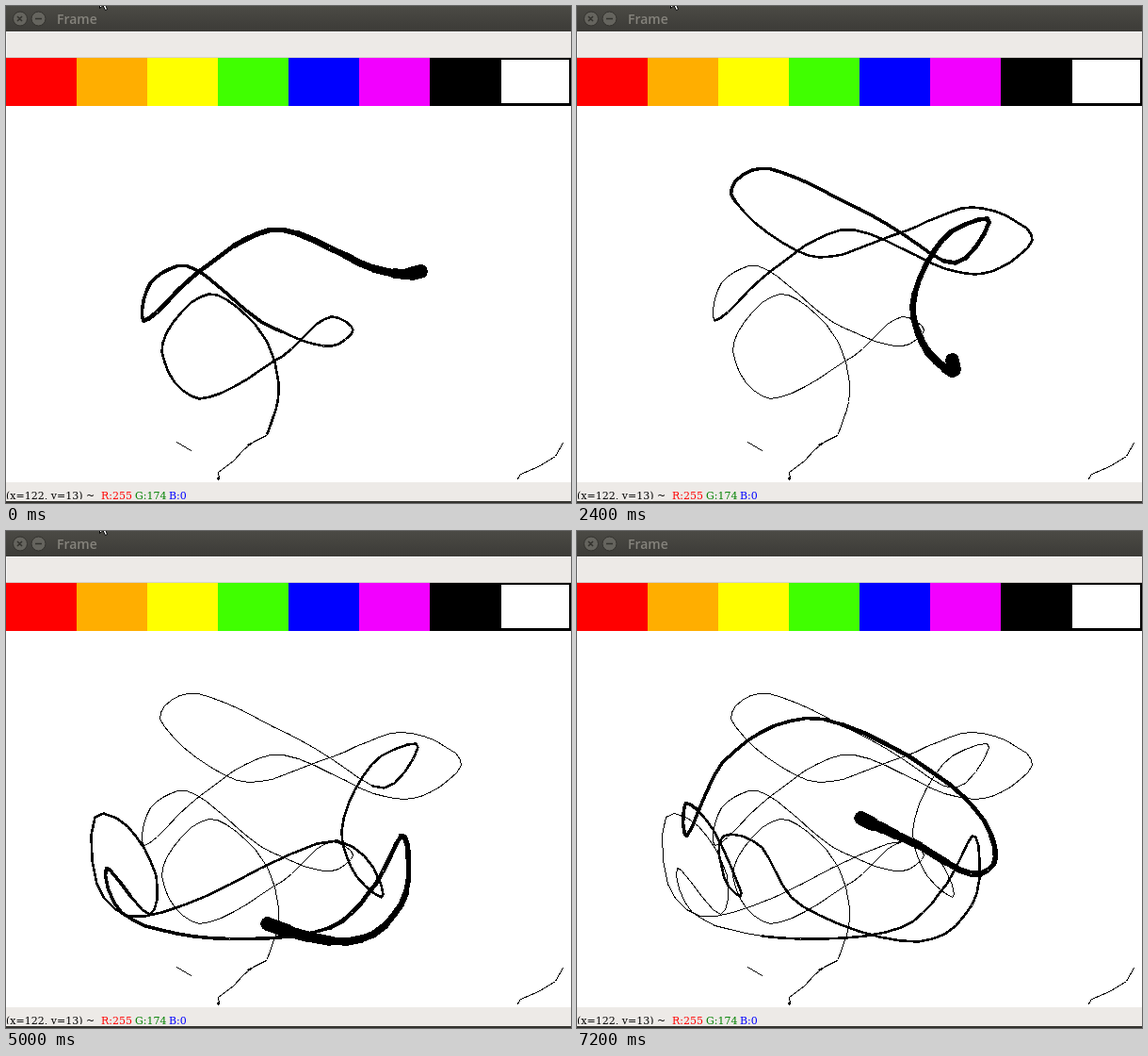
An HTML page that plays this animation: 600 px wide and 527 px high, repeating every 7.3 s.

```html
<!DOCTYPE html>
<html lang="en">
<head>
<meta charset="utf-8">
<title>Frame</title>
<style>
  html, body { margin: 0; width: 100%; height: 100%; overflow: hidden; background: #fff; }
  svg { display: block; width: 600px; height: 527px; }
  .title { font: 600 14px "Open Sans", sans-serif; fill: #85837c; }
  .status { font: 11px "DejaVu Serif", serif; }
  .ink { fill: none; stroke: #000; stroke-linecap: round; stroke-linejoin: round; shape-rendering: crispEdges; }
</style>
</head>
<body>
<svg viewBox="0 0 600 527">
  <defs>
    <linearGradient id="bar" x2="0" y2="1">
      <stop stop-color="#4b4a45"/>
      <stop offset="1" stop-color="#3c3b37"/>
    </linearGradient>
  </defs>
  <rect width="600" height="27" fill="url(#bar)"/>
  <g fill="#65645e" stroke="#33322e">
    <circle cx="15" cy="13.5" r="7.5"/>
    <circle cx="34.5" cy="13.5" r="7.5"/>
    <path d="M12 11l5 5m0-5l-5 5M31 13.5h7" stroke-width="1.6"/>
  </g>
  <text class="title" x="54" y="19">Frame</text>

  <rect y="27" width="600" height="28" fill="#edeae7"/>
  <path d="M0 27.5H600M.5 27V54" stroke="#f9f8f7"/>
  <path d="M0 54.5H600" stroke="#d8d4d0"/>

  <g id="palette" shape-rendering="crispEdges"></g>

  <g class="ink" transform="translate(.5 .5)">
    <path d="M181 462l15 9M543 501l3-5 19-8 18-11 8-14M226 501l-1-7 16-12 11-12 10-8 14-7"/>
    <path d="M257 465l2-1M225 500v1" stroke-width="2.5"/>
    <g id="trail"></g>
  </g>

  <rect y="505" width="600" height="20" fill="#edeae7"/>
  <text class="status" y="523"><tspan x="0">(x=122, y=13) ~</tspan><tspan x="101" fill="#f00">R:255</tspan><tspan x="137" fill="#008000">G:174</tspan><tspan x="173" fill="#00f">B:0</tspan></text>
  <rect y="523" width="600" height="2" fill="#edeae7"/>
  <rect y="525" width="600" height="2" fill="#33322e"/>

  <path id="cursor" d="M0 0V15L3.5 12 6 17 8 16 6 11H11Z" fill="#fff" stroke="#000"/>
</svg>
<script>
const $ = id => document.getElementById(id);

function add(parent, tag, attrs) {
  const el = document.createElementNS('http://www.w3.org/2000/svg', tag);
  for (const key in attrs) el.setAttribute(key, attrs[key]);
  return parent.appendChild(el);
}

['#f00', '#ffae00', '#ff0', '#40ff00', '#00f', '#f200ff', '#000', '#000'].forEach((fill, i) =>
  add($('palette'), 'rect', { x: i * 75, y: 55, width: 75, height: 51, fill }));
add($('palette'), 'rect', { x: 526, y: 57, width: 72, height: 46, fill: '#fff' });

// The route of the tracked ball
const route = [
  [276, 455], [289, 412], [273, 349], [214, 305], [165, 362], [200, 415], [292, 371], [345, 329],
  [368, 343], [346, 360], [276, 337], [188, 275], [152, 295], [146, 333], [205, 281], [284, 237],
  [398, 280], [440, 281], [483, 245], [424, 213], [340, 241], [250, 265], [163, 196], [192, 172],
  [326, 229], [403, 272], [437, 226], [392, 243], [356, 315], [372, 366], [400, 388], [385, 350],
  [348, 328], [197, 393], [132, 408], [98, 380], [96, 300], [127, 311], [160, 372], [152, 406],
  [106, 356], [120, 402], [196, 429], [345, 419], [390, 377], [421, 322], [423, 388], [375, 433],
  [235, 395], [190, 330], [153, 324], [158, 372], [174, 387], [137, 306], [115, 288], [115, 324],
  [158, 241], [248, 198], [418, 289], [444, 348], [425, 364], [355, 329], [296, 302]
];
// [step, position along the route]
const pace = [
  [-31.8, 0], [-16.7, 8], [-7.7, 13], [0, 17], [15, 24],
  [24, 30.4], [31, 37], [41, 43.4], [55, 52.6], [70, 62]
];
const RATE = 3.12;   // tracked points per step
const FIRST = -99;
const LOOP = 7300;

// Centripetal spline knots
const knots = [0];
for (let i = 1; i < route.length; i++) {
  const [a, b] = [route[i - 1], route[i]];
  knots.push(knots[i - 1] + Math.sqrt(Math.hypot(b[0] - a[0], b[1] - a[1])));
}

function slope(i, axis) {
  const rate = (a, b) => (route[b][axis] - route[a][axis]) / (knots[b] - knots[a]);
  if (i === 0) return rate(0, 1);
  if (i === route.length - 1) return rate(i - 1, i);
  return rate(i - 1, i) - rate(i - 1, i + 1) + rate(i, i + 1);
}

function spline(t) {
  let i = 0;
  while (i < route.length - 2 && knots[i + 1] < t) i++;
  const h = knots[i + 1] - knots[i];
  const u = Math.min(1, Math.max(0, (t - knots[i]) / h));
  const v = 1 - u;
  return [0, 1].map(axis => Math.round(
    route[i][axis] * v * v * (1 + 2 * u) + route[i + 1][axis] * u * u * (1 + 2 * v) +
    h * u * v * (slope(i, axis) * v - slope(i + 1, axis) * u)));
}

function knotAt(pos) {
  const i = Math.min(Math.floor(pos), route.length - 2);
  return knots[i] + (knots[i + 1] - knots[i]) * (pos - i);
}

function ballAt(step) {
  let i = 0;
  while (i < pace.length - 2 && pace[i + 1][0] < step) i++;
  const [[s0, p0], [s1, p1]] = [pace[i], pace[i + 1]];
  const [k0, k1] = [knotAt(p0), knotAt(p1)];
  return spline(k0 + (k1 - k0) * (step - s0) / (s1 - s0));
}

const LAST = Math.round(70 * RATE);
const points = [];
for (let n = FIRST; n <= LAST; n++) points.push(ballAt(n / RATE));

const thickness = age => Math.max(1, Math.floor(Math.sqrt(64 / (age + 1)) * 2.5));

const strokes = {};
for (let w = 1; w <= 14; w++) {
  strokes[w] = add($('trail'), 'path', { 'stroke-width': w > 1 ? w + 0.6 : 1 });
}

function drawTrail(step) {
  const head = Math.round(step * RATE) - FIRST;
  const d = {};
  let last = 0;
  for (let i = 1; i <= head; i++) {
    const w = thickness(head - i + 1);
    if (w !== last) d[w] = (d[w] || '') + 'M' + points[i - 1].join(' ');
    d[w] += 'L' + points[i].join(' ');
    last = w;
  }
  for (const w in strokes) strokes[w].setAttribute('d', d[w] || '');
}

function drawCursor(tick) {
  const place = tick < 56 ? '99.5 -12.5' : tick < 67 ? '82.5 -8.5' : '77.5 -11.5';
  $('cursor').setAttribute('transform', `translate(${place})`);
  $('cursor').setAttribute('visibility', tick < 68 ? 'visible' : 'hidden');
}

let shown = -1;
const start = performance.now();

function render() {
  const tick = Math.floor((performance.now() - start) % LOOP / 100);
  if (tick !== shown) {
    shown = tick;
    // The picture rests for two ticks after step 24
    drawTrail(tick < 24 ? tick : Math.max(24, tick - 2));
    drawCursor(tick);
  }
  requestAnimationFrame(render);
}
render();
</script>
</body>
</html>
```
